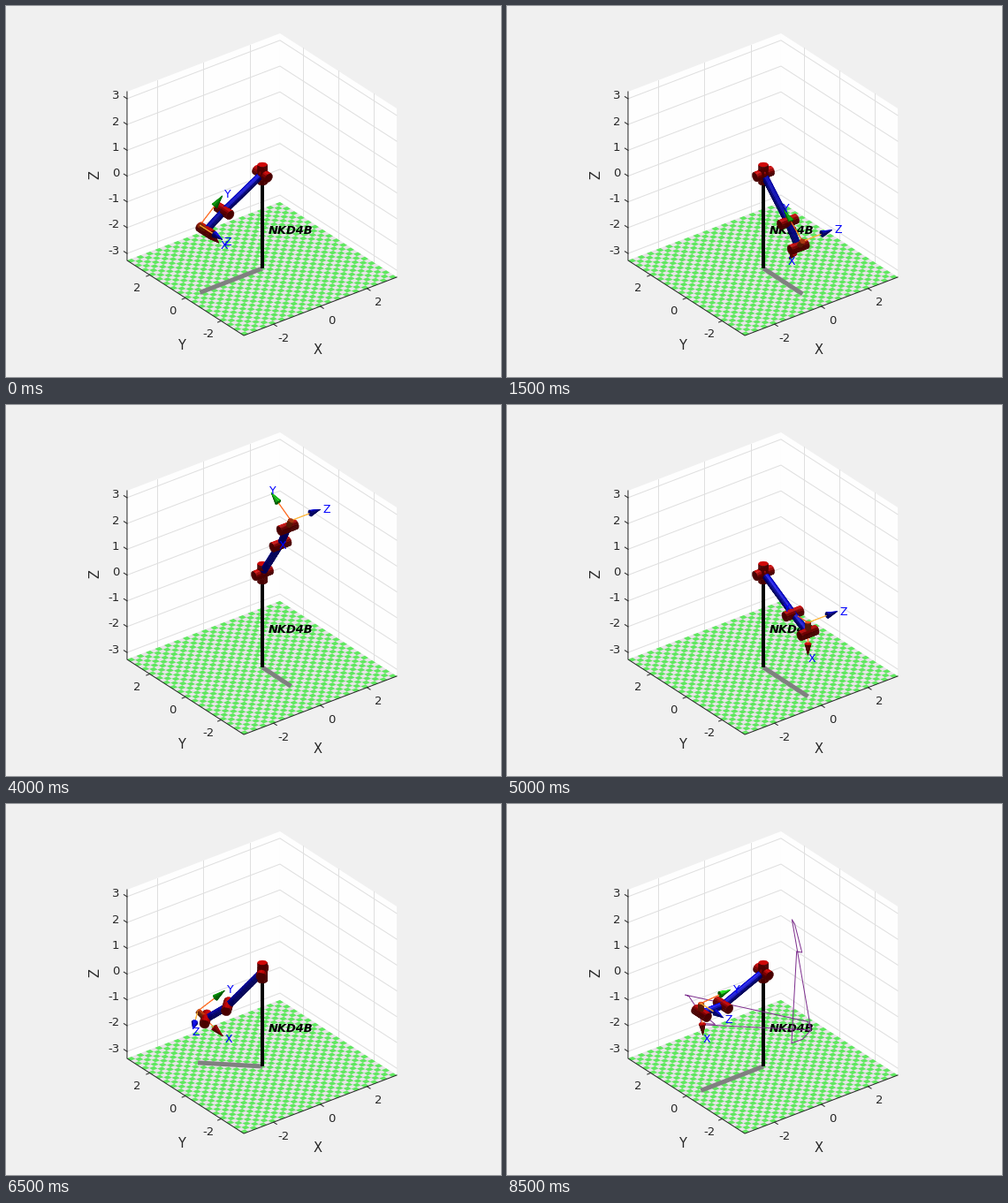
Write a matplotlib script that moves like this. It is 560 px wide and 420 px high and loops after 9 s.

```python
import numpy as np
import matplotlib.pyplot as plt
from matplotlib.animation import FuncAnimation
from matplotlib.collections import PolyCollection

W, H, DPI = 560, 420, 100
HALF = 3.27
FLOOR = -3.68
L1, L2, L3 = 1.86, 0.92, 0.40
EX, EY, EZ = np.array([26.45, -10.1]), np.array([-20.2, -13.0]), np.array([0, -29.2])
SHOULDER = np.array([290.0, 190.0])
VIEW = np.array([-0.527, -0.687, 0.5])
LAMP = np.array([0, 0, 6.0])

RED, BLUE, GREEN, ORANGE = (0.8, 0, 0), (0, 0, 0.95), (0, 0.95, 0), (0.95, 0.27, 0.05)
INK = "#262626"

# base turn, then the pitch of the upper arm, forearm and hand, in degrees
POSES = [
    (180, -28, -33, 50), (183, -28, -33, 50), (270, -28, -33, 50),
    (270, -42, -51, 54), (270, -56, -69, 58), (270, 46, 48, -96),
    (270, 46, 48, -50), (270, 56, 62, 45), (270, 57, 64, 62),
    (270, -28, -33, 50), (270, -27, -24, 90), (135, -34, -21, 46),
    (135, -38, -20, 56), (135, -50, -36, 47), (137, -64, -53, 46),
    (180, -28, -33, 50), (180, -24, -10, 76), (180, -22, 0, 86),
]


def project(p):
    p = np.asarray(p, float)
    return SHOULDER + p[..., :1] * EX + p[..., 1:2] * EY + p[..., 2:3] * EZ


def unit(v):
    return v / np.linalg.norm(v)


def shade(color, normal, point):
    light = unit(LAMP - point)
    diffuse = max(0.0, normal @ light) ** 1.5
    shine = max(0.0, normal @ unit(light + VIEW)) ** 14
    return np.clip(np.array(color) * (0.36 + 0.62 * diffuse) + 0.22 * shine, 0, 1)


def tube(faces, p, q, r0, r1, color, parts=4, sides=16):
    axis = unit(q - p)
    side = unit(np.cross(axis, (0.31, 0.52, 0.79)))
    other = np.cross(axis, side)
    angles = np.linspace(0, 2 * np.pi, sides + 1)
    spokes = np.outer(np.cos(angles), side) + np.outer(np.sin(angles), other)
    for k in range(parts):
        u, v = k / parts, (k + 1) / parts
        a = p + (q - p) * u + spokes * (r0 + (r1 - r0) * u)
        b = p + (q - p) * v + spokes * (r0 + (r1 - r0) * v)
        for i in range(sides):
            normal = unit(spokes[i] + spokes[i + 1])
            if normal @ VIEW > 0:
                quad = np.array([a[i], a[i + 1], b[i + 1], b[i]])
                mid = quad.mean(axis=0)
                faces.append((mid @ VIEW, project(quad), shade(color, normal, mid)))
    for end, normal, rad in ((p, -axis, r0), (q, axis, r1)):
        if rad and normal @ VIEW > 0:
            faces.append((end @ VIEW, project(end + spokes * rad),
                          shade(color, normal, end)))


def shaft(faces, p, q, color, parts=8):
    a, b = project(p), project(q)
    d = b - a
    wide = np.array([-d[1], d[0]]) / max(np.hypot(*d), 1e-6) * 0.35
    for k in range(parts):
        u, v = k / parts, (k + 1) / parts
        s, e = a + d * u, a + d * v
        depth = (p + (q - p) * (u + v) / 2) @ VIEW
        faces.append((depth, np.array([s + wide, e + wide, e - wide, s - wide]), color))


def joints(pose):
    turn, *pitch = np.radians(pose)
    out = np.array([np.cos(turn), np.sin(turn), 0])
    normal = np.array([-np.sin(turn), np.cos(turn), 0])
    up = np.array([0, 0, 1.0])
    pts = [np.zeros(3)]
    for length, a in zip((L1, L2, L3), pitch):
        pts.append(pts[-1] + length * (np.cos(a) * out + np.sin(a) * up))
    hand = pitch[2]
    x = -np.cos(hand) * out - np.sin(hand) * up
    y = -np.sin(hand) * out + np.cos(hand) * up
    return pts, (x, y, normal)


def build(pose):
    pts, frame = joints(pose)
    normal, up = frame[2], np.array([0, 0, 1.0])
    faces = []
    tube(faces, -0.35 * up, 0.35 * up, 0.165, 0.165, RED)
    for p in pts[:3]:
        tube(faces, p - 0.35 * normal, p + 0.35 * normal, 0.165, 0.165, RED)
    tube(faces, pts[0], pts[1], 0.115, 0.115, BLUE, 12)
    tube(faces, pts[1], pts[2], 0.115, 0.115, BLUE, 6)
    tube(faces, pts[2], pts[3], 0.09, 0.09, ORANGE, 3)
    tool = pts[3]
    tints = ((1, 0.5, 0.2), (1, 0.4, 0.1), (1, 0.7, 0.2))
    for d, color, tint in zip(frame, (RED, GREEN, BLUE), tints):
        shaft(faces, tool, tool + 0.9 * d, tint)
        tube(faces, tool + 0.82 * d, tool + 1.25 * d, 0.11, 0.0, color, 2, 12)
    faces.sort(key=lambda f: f[0])
    return faces, tool, [tool + 1.37 * d for d in frame]


fig = plt.figure(figsize=(W / DPI, H / DPI), dpi=DPI, facecolor="#f0f0f0")
ax = fig.add_axes([0, 0, 1, 1])
ax.set_xlim(0, W)
ax.set_ylim(H, 0)
ax.axis("off")


def line(points, color, width, z, **kw):
    px = np.array(points)
    return ax.plot(px[:, 0], px[:, 1], color=color, lw=width * 0.72, zorder=z, **kw)[0]


def label(x, y, s, size=13.3, color=INK, ha="center", z=6, **kw):
    return ax.text(x, y, s, fontsize=size * 0.72, color=color, ha=ha,
                   va="center_baseline" if not kw.get("rotation") else "center",
                   family="DejaVu Sans", zorder=z, **kw)


def corner(x, y, top=0):
    return np.array([289.5, 297.5]) + HALF * (x * EX + y * EY) - np.array([0, 191 * top])


def room():
    left, back, right, front = corner(-1, 1), corner(1, 1), corner(1, -1), corner(-1, -1)
    lift = np.array([0, -191])
    for a, b in ((left, back), (back, right)):
        ax.add_patch(plt.Polygon([a, b, b + lift, a + lift], fc="#fefefe", ec="none", zorder=0))
    floor = plt.Polygon([left, back, right, front], fc="#e9e3e9", ec="none", zorder=1)
    ax.add_patch(floor)

    n = 33
    s = 2 / n
    tiles = []
    for i in range(n):
        for j in range(i % 2, n, 2):
            x, y = -1 + i * s, -1 + j * s
            tiles.append([corner(x, y), corner(x + s, y),
                          corner(x + s, y + s), corner(x, y + s)])
    ax.add_collection(PolyCollection(tiles, facecolors="#5fe85f", edgecolors="none", zorder=1.1))

    grid = "#dfdfdf"
    for z in range(-3, 4):
        h = np.array([0, -95.5 - 29.2 * z])
        line([left + h, back + h, right + h], grid, 1, 0.5)
        tick = left + h
        line([tick, tick + (-3.6, -2.3)], INK, 1, 2)
        label(128.5, tick[1] - 4.5, str(z), ha="right")
    for v in (-2, 0, 2):
        for p in (corner(v / HALF, 1), corner(1, v / HALF)):
            line([p, p + lift], grid, 1, 0.5)
        p = corner(v / HALF, -1)
        line([p, p + (3.6, 2.3)], INK, 1, 2)
        label(p[0] + (11 if v < 0 else 13), p[1] + 14.5, str(v))
        p = corner(-1, v / HALF)
        line([p, p + (-3.8, 1.5)], INK, 1, 2)
        label(p[0] - 14.5, p[1] + 13, str(v))
    line([left + lift, left, front, right], INK, 1, 2)
    label(353, 388, "X", 14.6)
    label(198, 383, "Y", 14.6)
    label(101, 191, "Z", 14.6, rotation=90)


room()
base = np.array([290, 297])
shadow = line([base, base], "#808080", 5, 3, solid_capstyle="butt")
line([base, (290, 198)], "black", 4, 3.5, solid_capstyle="butt")
label(297, 253, "NKD4B", 13, "black", "left", 3.6, weight="bold", style="italic")
scenes = [build(p) for p in POSES]
trail = line([project(s[1]) for s in scenes], "#7e2f8e", 1, 3.8)
robot = PolyCollection([], linewidths=0.35, zorder=4)
ax.add_collection(robot)
names = [label(0, 0, s, 12.5, "blue", z=7) for s in "XYZ"]


def update(i):
    faces, tool, tips = scenes[i]
    robot.set_verts([f[1] for f in faces])
    colors = [f[2] for f in faces]
    robot.set_facecolor(colors)
    robot.set_edgecolor(colors)
    end = project([tool[0], tool[1], FLOOR])
    shadow.set_data([base[0], end[0]], [base[1], end[1]])
    for text, tip in zip(names, tips):
        text.set_position(project(tip) + (4, 0))
    trail.set_visible(i == len(POSES) - 1)
    return [robot, shadow, trail, *names]


anim = FuncAnimation(fig, update, frames=len(POSES), interval=500,
                     init_func=lambda: update(0), repeat=True, repeat_delay=0, blit=False)
plt.show()
```
